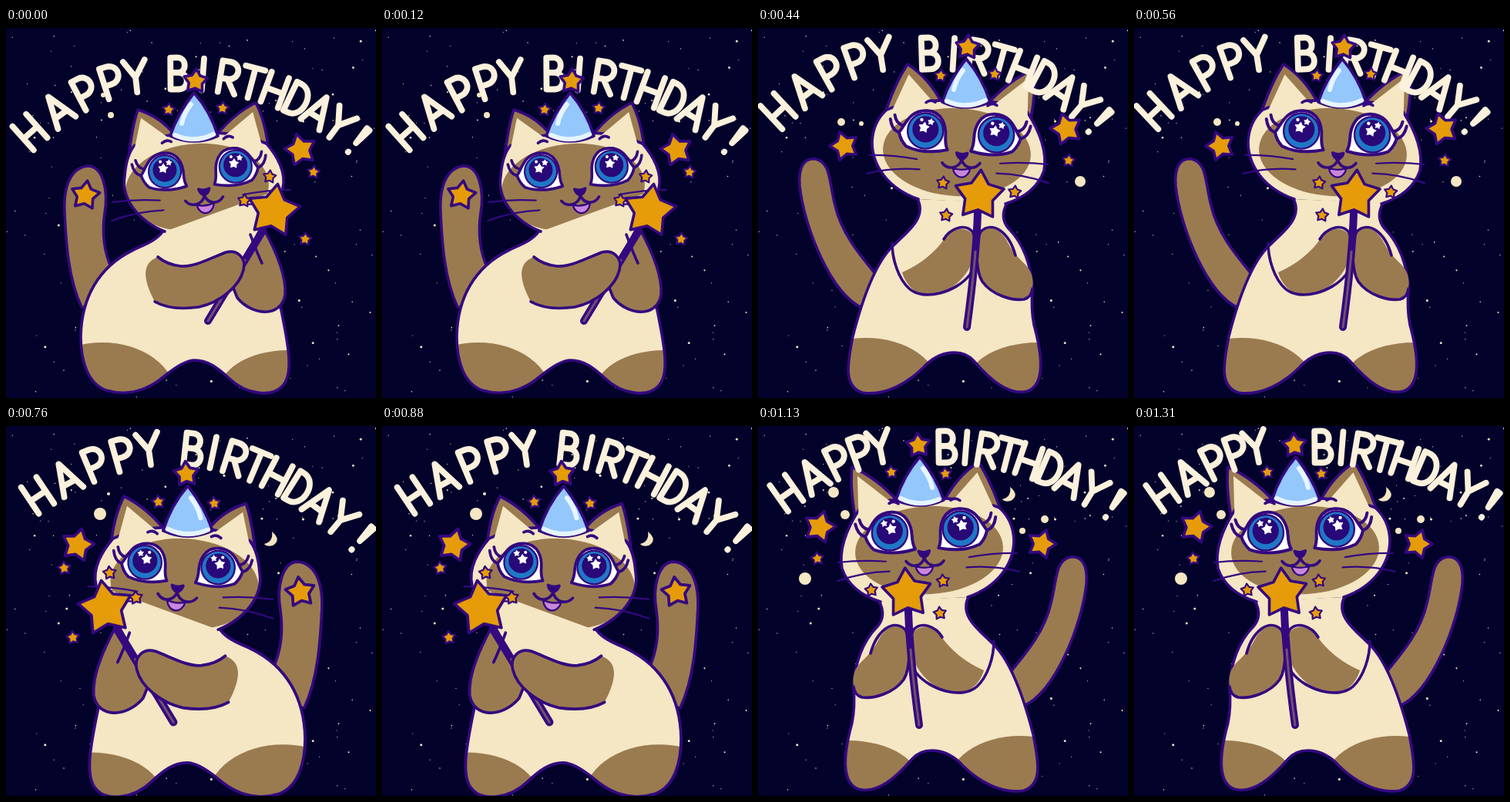
An HTML page for the animation above (1500 ms loop, 480 by 480 pixels).

```html
<!DOCTYPE html>
<html lang="en">
<head>
<meta charset="utf-8">
<title>Happy Birthday</title>
<style>
html, body { margin: 0; width: 100%; height: 100%; overflow: hidden; background: #02022b; }
svg { display: block; width: 100%; height: 100%; }
.pose { visibility: hidden; animation: 1500ms step-end infinite; }
#p0 { animation-name: first; }
#p1 { animation-name: second; }
#p2 { animation-name: third; }
#p3 { animation-name: fourth; }
@keyframes first { 0% { visibility: visible; } 25.333%, 100% { visibility: hidden; } }
@keyframes second { 0% { visibility: hidden; } 25.333% { visibility: visible; } 50.667%, 100% { visibility: hidden; } }
@keyframes third { 0% { visibility: hidden; } 50.667% { visibility: visible; } 75.333%, 100% { visibility: hidden; } }
@keyframes fourth { 0% { visibility: hidden; } 75.333%, 100% { visibility: visible; } }
.ink { stroke: #34087f; stroke-width: 3.6; stroke-linecap: round; stroke-linejoin: round; }
.thin { stroke-width: 2.2; }
.line { fill: none; }
.cream { fill: #f5e6c4; }
.brown { fill: #9a7b50; }
.white { fill: #fff; }
.blue { fill: #1f78c6; }
.dark { fill: #290878; }
.pink { fill: #c987db; }
.hat { fill: #94c7fb; }
.shine { fill: none; stroke: #e6f5ff; stroke-width: 6; stroke-linecap: round; }
.gold { fill: #e59c08; }
.letters { fill: none; stroke: #fbf1dc; stroke-width: 7.2; stroke-linecap: round; stroke-linejoin: round; }
</style>
</head>
<body>
<svg viewBox="0 0 480 480" role="img" aria-label="Happy birthday!">
<rect width="480" height="480" fill="#02022b"/>
<g id="sky"></g>
<g class="pose" id="p0"></g>
<g class="pose" id="p1"></g>
<g class="pose" id="p2"></g>
<g class="pose" id="p3"></g>
</svg>
<script>
const path = (cls, d) => `<path class="${cls}" d="${d}"/>`;
const group = (at, art) => `<g transform="${at}">${art}</g>`;
const flip = art => group('matrix(-1 0 0 1 480 0)', art);
const dot = (x, y, r, cls = 'cream') => `<circle class="${cls}" cx="${x}" cy="${y}" r="${r}"/>`;
const moon = (x, y) => path('cream', `M${x} ${y - 9}q13 11 1 18q-8 2-11-2q12-3 10-16Z`);

function star(x, y, r = 8.5, turn = 6, cls = 'ink gold' + (r < 12 ? ' thin' : '')) {
  const points = Array.from({ length: 10 }, (_, i) => {
    const a = (turn - 90 + i * 36) * Math.PI / 180, k = i % 2 ? r * 0.57 : r;
    return `${(x + k * Math.cos(a)).toFixed(1)} ${(y + k * Math.sin(a)).toFixed(1)}`;
  });
  return path(cls, `M${points.join('L')}Z`);
}

const glyphs = {
  H: 'M-11-19V19M11-19V19M-11 1H11',
  A: 'M-13 19L0-19L13 19M-8 7H8',
  P: 'M-8 19V-19H0C16-19 16 3 0 3H-8',
  Y: 'M-13-19L0 1L13-19M0 1V19',
  B: 'M-8-19V19H2C15 19 15-1 1-1H-8M1-1C12-1 12-19 0-19H-8',
  I: 'M0-19V19',
  R: 'M-9 19V-19H0C15-19 15 2 0 2H-9M0 2L11 19',
  T: 'M-12-18H12M0-18V19',
  D: 'M-9-19V19H-4C17 19 17-19-4-19Z',
  '!': 'M-2-18H2L0 4ZM0 18V18.5'
};

// Letters sit at even steps on a quadratic curve, turned along its tangent.
function word(text, x0, y0, x1, y1, x2, y2) {
  const art = [...text].map((ch, i) => {
    const t = i / (text.length - 1), u = 1 - t;
    const x = u * u * x0 + 2 * u * t * x1 + t * t * x2;
    const y = u * u * y0 + 2 * u * t * y1 + t * t * y2;
    const turn = Math.atan2(u * (y1 - y0) + t * (y2 - y1), u * (x1 - x0) + t * (x2 - x1)) * 180 / Math.PI;
    return group(`translate(${x} ${y}) rotate(${turn}) scale(1.08)`, path('line', glyphs[ch]));
  });
  return `<g class="letters">${art.join('')}</g>`;
}

// Fills the part of the ellipses that lies inside an outline.
function patches(id, outline, ellipses) {
  return `<clipPath id="${id}"><path d="${outline}"/></clipPath><g class="brown" clip-path="url(#${id})">` +
    ellipses.map(([x, y, rx, ry, turn = 0]) =>
      `<ellipse rx="${rx}" ry="${ry}" transform="translate(${x} ${y}) rotate(${turn})"/>`).join('') + '</g>' +
    path('ink line', outline);
}

const ear = ([x0, y0, x1, y1, x2, y2]) => path('ink brown', `M${x0} ${y0}Q${(x0 + x1) / 2 - 2} ${(y0 + y1) / 2 - 8} ${x1} ${y1}Q${(x1 + x2) / 2 + 5} ${(y1 + y2) / 2 - 8} ${x2} ${y2}Z`);

function innerEar([x0, y0, x1, y1, x2, y2]) {
  const mx = (x0 + x2) / 2, my = (y0 + y2) / 2;
  const near = (x, y, k, drop) => `${x + (mx - x) * k} ${y + (my - y) * k + drop}`;
  return path('cream', `M${near(x0, y0, 0.16, 3)}L${near(x1, y1, 0.22, 0)}L${near(x2, y2, 0.16, 3)}Z`);
}

function eye(side, size) {
  const lid = path('ink white', 'M-30 2C-23-6-20-25 2-25C20-25 25-8 25 4Q25 14 28 20Q0 27-21 18Q-28 11-30 2Z') +
    path('ink line', 'M-31 2Q-39-1-41-13M-26-6Q-34-8-36-18');
  const iris = dot(1, -1, 21, 'ink thin blue') + dot(1, -3, 15.5, 'dark') +
    star(-1, -5, 7, 8, 'white') + star(7, -12, 4.5, 8, 'white') + dot(-4, -14, 2, 'white');
  return group(`translate(${46 * side} 0) scale(${size})`, group(`scale(${-side} 1)`, lid) + iris);
}

const whiskers = side => group(`scale(${side} 1)`,
  path('ink thin line', 'M54 36Q85 32 116 34M50 49Q85 48 118 58'));
const brow = side => path('ink line', `M${40 * side - 6}-38q6-5 12-1`);

const face = size => eye(-1, size) + eye(1, size) + brow(-1) + brow(1) + whiskers(-1) + whiskers(1) +
  group('translate(4 29)',
    path('ink thin pink', 'M-11 16C-8 31 9 32 12 15Q0 20-11 16Z') +
    path('ink line', 'M-25 10C-18 19-4 17 0 5C5 17 18 17 24 8') +
    path('ink dark', 'M-7-4Q0-1 7-4Q5 3 0 4Q-5 3-7-4Z'));

const hat = (x, y) => group(`translate(${x} ${y})`,
  path('ink hat', 'M0 0Q-21 26-31 56Q0 70 31 56Q21 24 0 0Z') +
  path('shine', 'M-25 55Q0 66 25 54M-4 15Q-13 26-16 40') +
  star(2, -15, 16, 4) + star(-33, 22) + star(37, 20));

const head = (id, outline, ears, mask, at, size) => ears.map(ear).join('') +
  path('cream', outline) + patches(id, outline, [mask]) + ears.map(innerEar).join('') +
  group(at, face(size));

const wand = (d, inner) => `<g style="stroke-width:10">${path('ink line', d).replace('/>', ' style="stroke-width:10"/>')}</g>` +
  `<path d="${inner}" fill="none" stroke="#72506f" stroke-width="3" stroke-linecap="round"/>`;

function sideCat(id) {
  const body = 'M206 260C198 275 180 281 165 288C120 310 98 350 97 400C97 430 105 461 130 470C160 479 186 468 205 452C222 438 235 431 245 431C262 431 275 441 290 455C312 476 345 479 358 465C374 450 366 410 357 366L330 258';
  const skull = 'M206 264C172 250 149 222 154 192Q156 166 166 153C204 133 290 128 338 150C352 166 364 188 359 208';
  return path('ink brown', 'M98 362C81 326 78 280 76 240C74 202 86 181 106 179C126 179 133 211 128 240C124 268 127 290 137 312L122 345') +
    path('cream', body) + patches(id + 'b', body, [[125, 478, 95, 70], [365, 478, 92, 60]]) +
    path('ink brown', 'M333 258C348 285 364 320 362 346C357 376 320 374 300 350L292 330C307 314 312 298 316 276Z') +
    path('cream', 'M270 250H333L318 281L308 298L285 288Z') +
    wand('M333 263L262 380', 'M310 301L262 380') +
    path('ink line', 'M317 268Q325 290 332 305') +
    path('brown', 'M197 297C176 305 177 325 193 355L250 350Z') +
    path('ink brown', 'M197 297Q209 307 227 309C245 310 262 300 285 291C300 287 312 298 308 314C303 335 278 356 250 362C228 365 207 363 193 355') +
    path('cream', 'M206 262L328 262L359 208L300 200Z') +
    head(id + 'h', skull, [[159, 170, 171, 106, 220, 140], [272, 140, 324, 97, 341, 164]],
      [248, 207, 93, 57, -4], 'translate(251 184) rotate(-4)', 1);
}
const sideProps = hat(244, 84) + star(103, 217, 19, 8) + star(347, 237, 35, 9) + star(382, 158, 21, -14) +
  star(399, 187) + star(342, 193) + star(309, 224) + star(388, 274);

function frontCat(id) {
  const body = 'M207 222C219 246 194 264 178 280C150 304 132 365 123 400C115 440 112 465 135 473C165 478 195 460 215 440C235 418 265 415 280 432C300 455 325 478 350 471C373 462 369 425 358 385Q354 365 356 340C355 308 344 279 325 260Q313 246 323 227';
  const skull = 'M208 222C168 208 148 178 148 148Q149 122 167 106C205 90 310 88 348 107C363 130 376 158 371 185C362 211 340 222 321 228';
  return path('ink brown', 'M135 363C95 345 60 260 54 205C52 180 60 168 75 170C95 175 92 200 100 230C108 265 130 292 150 316') +
    path('cream', body) + patches(id + 'b', body, [[140, 468, 95, 66], [362, 468, 95, 60]]) +
    path('brown', 'M187 317C210 307 230 291 243 272C255 255 278 258 282 275C286 310 255 346 220 347C200 345 190 328 187 317Z') +
    path('brown', 'M285 272C292 250 315 258 325 280C335 300 350 305 355 320C362 345 345 357 325 351C300 345 282 330 283 300Z') +
    path('ink line', 'M174 279C174 300 182 325 196 338C215 355 257 343 275 320C286 303 288 282 278 264C268 253 249 260 241 274') +
    path('ink line', 'M334 295C326 266 305 249 289 264C282 277 282 315 291 329C304 347 330 354 345 352Q355 349 356 338') +
    wand('M285 240Q283 300 271 388', 'M282 290Q279 330 271 388') +
    head(id + 'h', skull, [[163, 116, 194, 47, 239, 98], [298, 98, 358, 53, 354, 118]],
      [258, 161, 96, 57, 3], 'translate(262 137) rotate(3)', 1.1);
}
const frontProps = hat(270, 40) + star(287, 217, 33, 4) + star(112, 153, 19, -18) + star(400, 131, 21, -16) +
  star(403, 172) + star(240, 201) + star(333, 213) + star(244, 243);

const grow = 'translate(240 260) scale(1.035) translate(-240 -260)';
const poses = [
  dot(136, 113, 4) + dot(126, 87, 3) + sideCat('a') +
    word('HAPPY', 31, 135, 104, 70, 168, 63) + word('BIRTHDAY!', 222, 59, 358, 58, 457, 146) + sideProps,
  dot(108, 122, 5) + dot(134, 124, 3) + dot(418, 199, 7) + frontCat('b') +
    word('HAPPY', 26, 108, 94, 44, 159, 34) + word('BIRTHDAY!', 221, 33, 355, 29, 443, 121) + frontProps,
  dot(122, 114, 8) + dot(133, 88, 2) + moon(345, 146) + flip(group(grow, sideCat('c'))) +
    word('HAPPY', 41, 90, 116, 40, 185, 30) + word('BIRTHDAY!', 241, 30, 352, 42, 462, 146) + flip(group(grow, sideProps)),
  dot(98, 86, 7) + dot(113, 115, 6) + dot(61, 198, 8) + dot(343, 136, 4) + dot(372, 121, 5) + moon(327, 88) + flip(frontCat('d')) +
    word('HAPPY', 37, 87, 108, 37, 158, 27) + word('BIRTHDAY!', 243, 27, 350, 26, 462, 102) + flip(frontProps)
];
poses.forEach((art, i) => document.getElementById('p' + i).innerHTML = art);

let seed = 29;
const rand = () => (seed = seed * 16807 % 2147483647) / 2147483647;
rand();
document.getElementById('sky').innerHTML = Array.from({ length: 180 }, () =>
  dot(rand() * 480, rand() * 480, 0.55 + rand() ** 3 * 1.1)).join('');
</script>
</body>
</html>
```
